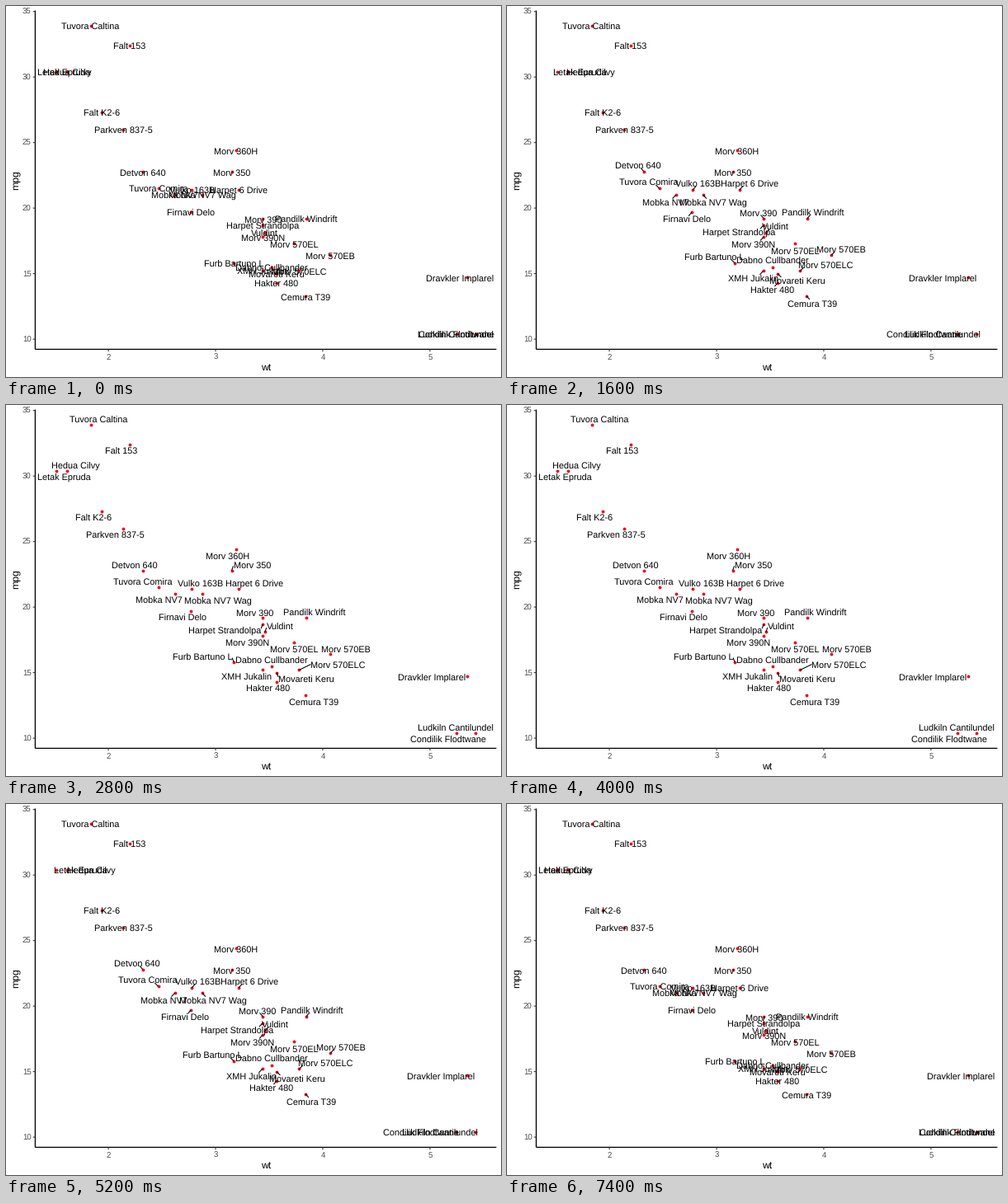
These frames come from a looping animation (600x450 px, 7.6 s). A matplotlib script:

```python
import numpy as np
import matplotlib.pyplot as plt
from matplotlib.animation import FuncAnimation

W, H, DPI = 600, 450, 72
FRAMES, INTERVAL = 38, 200
LEFT, RIGHT, TOP, BOTTOM = 35.4, 594.4, 5.5, 416.4
PAD = 3              # gap between a label and the panel edge
CAP = 3.9            # half the cap height
BASELINE = 4.9       # from label centre down to its baseline
RISE = 7.2           # how far a label ends above or below its point
MIN_LINK = 5.6       # shorter connectors stay hidden
EDGE_ZONE = 60

plt.rcParams["font.family"] = "Liberation Sans"
plt.rcParams["text.hinting"] = "none"

# name, weight, miles per gallon, side of the point where the label ends;
# repeated E or W means farther out
CARS = [
    ("Tuvora Caltina", 1.835, 33.9, "NE"),
    ("Falt 153", 2.2, 32.4, "SW"),
    ("Letak Epruda", 1.513, 30.4, "S"),
    ("Hedua Cilvy", 1.615, 30.4, "NE"),
    ("Falt K2-6", 1.935, 27.3, "SW"),
    ("Parkven 837-5", 2.14, 26.0, "SW"),
    ("Morv 360H", 3.19, 24.4, "SW"),
    ("Morv 350", 3.15, 22.8, "NEEE"),
    ("Detvon 640", 2.32, 22.8, "NW"),
    ("Tuvora Comira", 2.465, 21.5, "NWW"),
    ("Vulko 163B", 2.78, 21.4, "NE"),
    ("Harpet 6 Drive", 3.215, 21.4, "NEE"),
    ("Mobka NV7", 2.62, 21.0, "SWW"),
    ("Mobka NV7 Wag", 2.875, 21.0, "SEE"),
    ("Firnavi Delo", 2.77, 19.7, "SW"),
    ("Morv 390", 3.44, 19.2, "NW"),
    ("Pandilk Windrift", 3.845, 19.2, "NE"),
    ("Harpet Strandolpa", 3.44, 18.7, "SWWW"),
    ("Vuldint", 3.46, 18.1, "NEEE"),
    ("Morv 390N", 3.44, 17.8, "SWW"),
    ("Morv 570EL", 3.73, 17.3, "S"),
    ("Morv 570EB", 4.07, 16.4, "NEE"),
    ("Furb Bartuno L", 3.17, 15.8, "NWWW"),
    ("Dabno Cullbander", 3.52, 15.5, "N"),
    ("Morv 570ELC", 3.78, 15.2, "NEEEE"),
    ("XMH Jukalin", 3.435, 15.2, "SWW"),
    ("Movareti Keru", 3.57, 15.0, "SEEE"),
    ("Hakter 480", 3.57, 14.3, "SW"),
    ("Cemura T39", 3.84, 13.3, "SE"),
    ("Dravkler Implarel", 5.345, 14.7, "WWW"),
    ("Ludkiln Cantilundel", 5.424, 10.4, "N"),
    ("Condilik Flodtwane", 5.25, 10.4, "SW"),
]
MPGS = [car[2] for car in CARS]

# share of the way covered at each level of spreading
LEVELS = [0, 4, 6, 8, 12]
SLIDE = [0, 0.42, 0.65, 0.68, 1]
LIFT = [0, 0.75, 1.15, 1.15, 1]
LATE = [0, 0, 0, 0, 1]
SWING = [0, 0.55, 1, 1.08, 0]


def px(wt):
    return LEFT + (wt - 1.31745) * (RIGHT - LEFT) / 4.3021


def py(mpg):
    return BOTTOM - (mpg - 9.225) * (BOTTOM - TOP) / 25.85


fig = plt.figure(figsize=(W / DPI, H / DPI), dpi=DPI, facecolor="white")
ax = fig.add_axes([0, 0, 1, 1])
ax.set_xlim(0, W)
ax.set_ylim(H, 0)
ax.axis("off")


def stroke(xs, ys, color="black", width=1.07, z=1):
    return ax.plot(xs, ys, color=color, lw=width, zorder=z, snap=False,
                   solid_capstyle="butt")[0]


def draw_axes():
    stroke([LEFT, LEFT], [TOP, BOTTOM], width=1.3)
    stroke([LEFT, RIGHT], [BOTTOM, BOTTOM], width=1.3)
    tick = dict(size=9.6, color="#4d4d4d")
    for v in range(2, 6):
        stroke([px(v)] * 2, [BOTTOM, BOTTOM + 2.75], "#333333")
        ax.text(px(v), 429, str(v), ha="center", **tick)
    for v in range(10, 36, 5):
        stroke([LEFT - 2.75, LEFT], [py(v)] * 2, "#333333")
        ax.text(30.6, py(v) + 3.6, str(v), ha="right", **tick)
    ax.text((LEFT + RIGHT) / 2, 442, "wt", size=12.3, ha="center")
    ax.text(17.5, (TOP + BOTTOM) / 2, "mpg", size=12.3, rotation=90,
            ha="right", va="center")


class Label:
    def __init__(self, name, wt, mpg, side):
        self.x, self.y = px(wt), py(mpg)
        self.text = ax.text(0, 0, name, size=10.9, ha="center",
                            va="baseline", zorder=4)
        self.link = stroke([], [], z=3)
        box = self.text.get_window_extent(fig.canvas.get_renderer())
        self.half = box.width / 2

        reach = [0, 10, 19, self.half + 2, self.half + 14]
        dx = reach[side.count("E")] - reach[side.count("W")]
        self.start = self.keep_inside(self.x)
        self.run = self.keep_inside(self.x + dx) - self.start
        self.rise = RISE * (side.count("S") - side.count("N"))

        # neighbours in one row near an edge are first driven inward
        gap_left, gap_right = self.x - LEFT, RIGHT - self.x
        near = min(gap_left, gap_right)
        pinned = near < EDGE_ZONE and MPGS.count(mpg) > 1
        inward = 1 if gap_left < gap_right else -1
        self.swing = 0.7 * near * inward if pinned else 0

        # labels outside the crowd wait until it has settled
        loose = mpg + wt > 25.5
        self.slide = LATE if loose else SLIDE
        self.lift = LATE if loose or pinned else LIFT

    def keep_inside(self, x):
        return np.clip(x, LEFT + PAD + self.half, RIGHT - PAD - self.half)

    def place(self, level):
        def at(profile):
            return np.interp(level, LEVELS, profile)

        cx = self.start + self.run * at(self.slide) + self.swing * at(SWING)
        cy = self.y + self.rise * at(self.lift)
        self.text.set_position((cx, cy + BASELINE))
        ex, ey = self.anchor(cx, cy)
        if np.hypot(ex - self.x, ey - self.y) > MIN_LINK:
            self.link.set_data([self.x, ex], [self.y, ey])
        else:
            self.link.set_data([], [])

    def anchor(self, cx, cy):
        """Nearest spot on the label box, nudged to the middle of its side."""
        ex = np.clip(self.x, cx - self.half, cx + self.half)
        ey = np.clip(self.y, cy - CAP, cy + CAP)
        d = np.hypot(self.x - ex, self.y - ey)
        if d == 0:
            return self.x, self.y
        to_mid_x = np.hypot(self.x - cx, self.y - ey)
        to_mid_y = np.hypot(self.x - ex, self.y - cy)
        on_top, on_side = ey != self.y, ex != self.x
        if on_top and (not on_side or to_mid_x < to_mid_y):
            ex += (cx - ex) * d / to_mid_x
        else:
            ey += (cy - ey) * d / to_mid_y
        return ex, ey


draw_axes()
labels = [Label(*car) for car in CARS]
ax.scatter([l.x for l in labels], [l.y for l in labels], s=3.8 ** 2,
           color="#ee0018", linewidths=0, zorder=2)


def update(i):
    # spread out, hold, then collapse again
    level = int(np.clip(min(i - 2, 34 - i), 0, 12))
    for label in labels:
        label.place(level)
    return []


anim = FuncAnimation(fig, update, frames=FRAMES, interval=INTERVAL,
                     init_func=lambda: update(0), repeat=True,
                     repeat_delay=0, blit=False)
plt.show()
```
